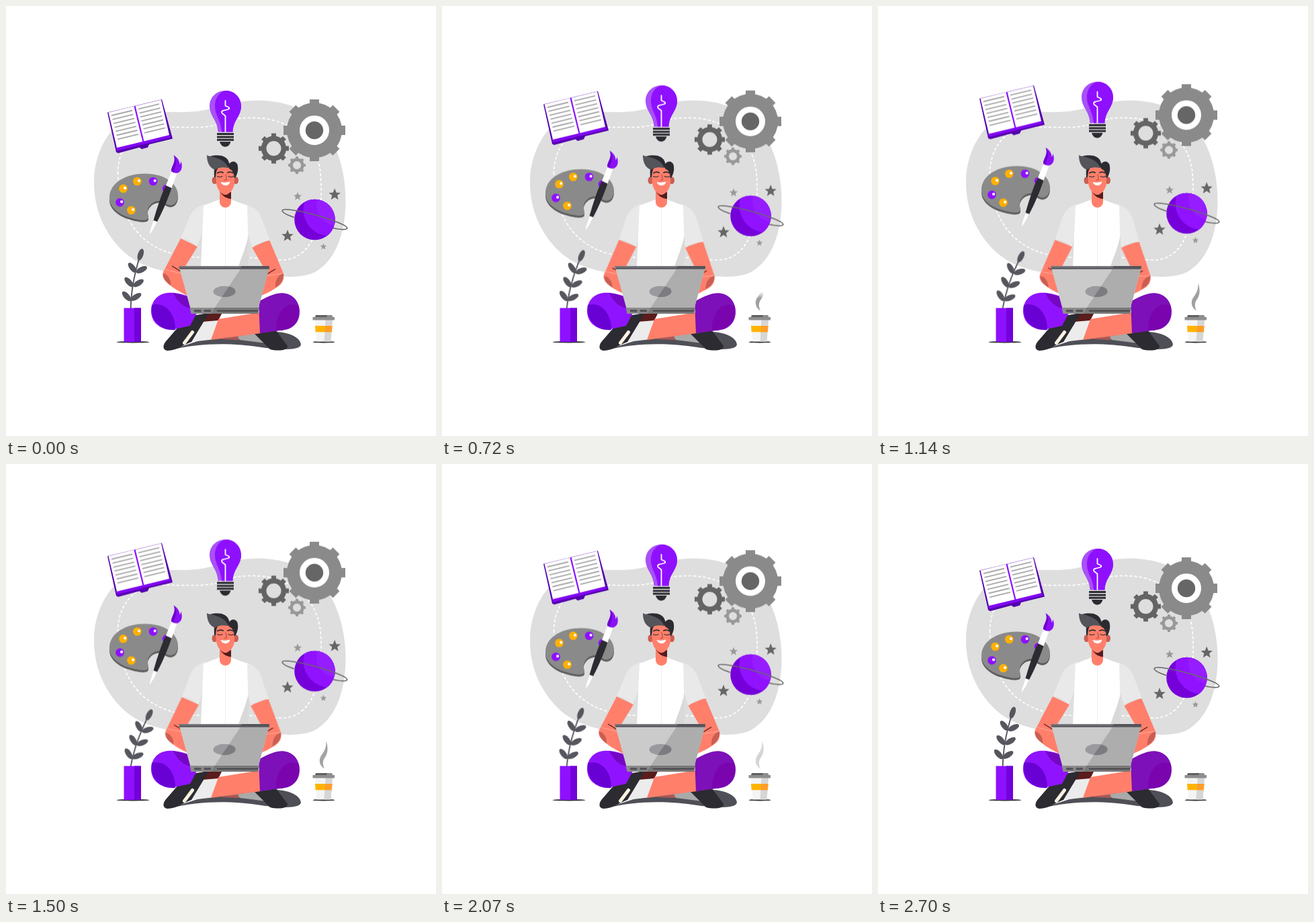
An HTML page that plays this animation: 640x640 px, repeating every 2.76 s.

```html
<!DOCTYPE html>
<html lang="en">
<head>
<meta charset="utf-8">
<title>Creative work</title>
<style>
html, body { margin: 0; width: 100%; height: 100%; overflow: hidden; background: #fff; }
svg { display: block; width: 100%; height: 100%; }

/* 2700 ms of motion followed by a 60 ms rest */
.float, .plant, .arm, .steam, .reveal {
  animation: 2760ms cubic-bezier(.37, 0, .63, 1) infinite;
}
.float { animation-name: float; }
.plant { animation-name: sway; transform-origin: 186px 450px; }
.arm { animation-name: swing; }
.arm.l { --turn: -4.2deg; transform-origin: 290px 300px; }
.arm.r { --turn: 4.2deg; transform-origin: 362px 300px; }
.steam { animation-name: fade; }
.reveal { animation-name: rise; }

@keyframes float {
  0%, 97.83%, 100% { transform: translateY(0); }
  48.91% { transform: translateY(var(--lift)); }
}
@keyframes sway {
  0%, 97.83%, 100% { transform: rotate(0); }
  48.91% { transform: rotate(9.6deg); }
}
@keyframes swing {
  0%, 64.5%, 100% { transform: rotate(0); }
  20.3%, 44.2% { transform: rotate(var(--turn)); }
}
@keyframes rise {
  0% { transform: translateY(48px); }
  48.91%, 100% { transform: translateY(0); }
}
@keyframes fade {
  0%, 48.91% { opacity: 1; }
  97.83%, 100% { opacity: 0; }
}
</style>
</head>
<body>
<svg viewBox="0 0 640 640">
  <defs>
    <path id="teeth" d="M-7-46H7V-36H-7ZM-7 46H7V36H-7ZM-46-7V7H-36V-7ZM46-7V7H36V-7Z"/>
    <g id="cogs"><use href="#teeth"/><use href="#teeth" transform="rotate(45)"/></g>
    <path id="star" d="M0-10L2.7-3.4 9.5-3.1 4.2 1.3 5.9 8.1 0 4.4-5.9 8.1-4.2 1.3-9.5-3.1-2.7-3.4Z"/>
    <g id="dot"><circle r="6.3"/><circle cx="2.6" cy="-1" r="2.1" fill="#fff"/></g>
    <ellipse id="leaf" rx="9" ry="4.1"/>
    <path id="palette" d="M154 284C155 262 180 249.5 207 249.5C238 249.5 257 266 256 283C255 296 245 300 236 293C228 286 214 292 211 303C210 311 214 313 211 317C206 321 190 317 178 313C164 307 153 297 154 284Z"/>
    <path id="lines" d="M157 163l31-7.5m-29.5 13.4l31-7.5m-29.5 13.4l31-7.5m-29.5 13.4l31-7.5m-29.5 13.4l31-7.5m-29.5 13.4l31-7.5m-29.5 13.4l31-7.5"/>
    <clipPath id="globe"><circle cx="459.5" cy="318" r="30.3"/></clipPath>
    <linearGradient id="edge" x2="0" y2="1">
      <stop offset="0" stop-color="#fff" stop-opacity="0"/>
      <stop offset=".16" stop-color="#fff"/>
    </linearGradient>
    <mask id="wisp" maskUnits="userSpaceOnUse" x="440" y="390" width="60" height="80">
      <rect class="reveal" x="450" y="404" width="40" height="60" fill="url(#edge)"/>
    </mask>
  </defs>

  <path fill="#dedede" d="M131 262C131 215 160 158 215 157C245 157 270 160 295 155C325 149 345 140 375 140.500C425 141 455 160 473 182C497 212 505.500 255 505.500 290C505.500 335 492 378 460 396C445 403 430 404 400 402L250 397C215 392 185 380 164 354C144 330 131 300 131 262Z"/>
  <path fill="none" stroke="#fff" stroke-width="1.700" stroke-dasharray="4.200 3" d="M166.500 250C166 215 186 181 230 180C260 180 290 183 314 177C335 168 352 165 380 167C430 172 465 205 468 250C473 310 462 378 410 378C385 378 375 374 350 374H290C235 374 170 350 166.500 250Z"/>

  <!-- book -->
  <g class="float" style="--lift:-22px">
    <path fill="#5400ae" d="M151 158.500L232 139L248 197.500 213 206 211 210.500 202 213 198.500 210.500 167 219 164 217.500Z"/>
    <path fill="#8208f2" d="M163 211L243 191.500 245.500 195.500 166 215.500Z"/>
    <path fill="#fff" d="M152.500 158.500L191 149 204.500 201.500 165 211ZM192 149L231 139.500 243 192 204.500 201.500Z"/>
    <path stroke="#8b11ff" stroke-width="2.200" d="M191.500 149L204.500 202"/>
    <g fill="none" stroke="#a9a9a9" stroke-width="1.900"><use href="#lines"/><use href="#lines" x="40" y="-9.600"/></g>
  </g>

  <!-- bulb -->
  <g class="float" style="--lift:-14px">
    <path fill="#a950f6" d="M326.500 126C340 126 350 136 350 149C350 164 338 170 337.500 187.500H315.500C315 170 303 164 303 149C303 136 313 126 326.500 126Z"/>
    <path fill="#8f10ff" d="M329 126C341 127 350 137 350 149C350 164 338 170 337.500 187.500H321C320 170 311 163 311 149C311 136 319 126 329 126Z"/>
    <path fill="none" stroke="#fff" stroke-width="1.800" stroke-linecap="round" stroke-linejoin="round" d="M326.500 187V163.500L322 160C320 158 321 156 324 155.500L330 154C333 153 333 151.500 331 150.500L326.500 148.500V141"/>
    <path stroke="#2b2b31" stroke-width="3" d="M314 190.500H339M314 195H339M314 199.300H339"/>
    <path fill="#2b2b31" d="M318 202H334.500C333 207 330 209.500 326.300 209.500S319.500 207 318 202Z"/>
  </g>

  <!-- gears -->
  <g class="float" style="--lift:-24px">
    <g transform="translate(459 185)">
      <circle r="31.500" fill="#fff" stroke="#8a8a8a" stroke-width="19"/>
      <use href="#cogs" fill="#8a8a8a"/>
      <circle r="13.200" fill="#666"/>
    </g>
    <g transform="translate(398.500 212)">
      <circle r="14.800" fill="none" stroke="#646464" stroke-width="7.600"/>
      <use href="#cogs" transform="scale(.49)" fill="#646464"/>
    </g>
    <g transform="translate(433 237)">
      <circle r="8.400" fill="none" stroke="#989898" stroke-width="4.600"/>
      <use href="#cogs" transform="scale(.28)" fill="#989898"/>
    </g>
  </g>

  <!-- palette and brush -->
  <g class="float" style="--lift:-12px">
    <use href="#palette" y="3" fill="#5d5d5d"/>
    <use href="#palette" fill="#8a8a8a"/>
    <g fill="#ffb000"><use href="#dot" x="174.500" y="271.800"/><use href="#dot" x="195.300" y="261"/><use href="#dot" x="186.500" y="304"/></g>
    <g fill="#8f10ff"><use href="#dot" x="219" y="261"/><use href="#dot" x="169.500" y="292.300"/><use href="#dot" x="239" y="272"/></g>
    <path fill="#fff" stroke="#d0d0d0" stroke-width=".5" d="M213 341C214 333 217 327 220 317L225.500 320C221 330 218 336 213 341Z"/>
    <path fill="#2b2b31" d="M219.500 319C225 300 231 281 238 267L246.500 270.500C242 285 234 304 225 321Z"/>
    <path fill="#fff" d="M238 267L246.500 246 254.500 249 246.500 271Z"/>
    <path fill="#8a10f5" d="M246 246C246 238 254 232 249.500 222C256 226 258.500 231 258.500 236C260 234 260.500 232 260.500 231C263 239 262 246 255.500 248.500C252 249 249 248 246 246Z"/>
    <path fill="#6d00d0" d="M246 246C246 238 254 232 249.500 222C258 232 250 239 250 248Z"/>
  </g>

  <!-- planet and stars -->
  <g class="float" style="--lift:-10px">
    <g clip-path="url(#globe)">
      <path fill="#7600da" d="M429 287h61v62h-61z"/>
      <circle cx="482" cy="303" r="39.500" fill="#9012ff"/>
      <circle cx="492" cy="297" r="30" fill="#961dff"/>
    </g>
    <path transform="translate(459.500 317.500) rotate(15.300)" fill="none" stroke="#686868" stroke-width="1.700" d="M-30 5.300C-43 4.500-50 2.500-50 0C-50-3.500-28-6.500 0-6.500S50-3.500 50 0C50 2.500 43 4.500 30 5.300"/>
    <g fill="#666"><use href="#star" transform="translate(489.200 280.800) scale(.92)"/><use href="#star" transform="translate(419 342.300) scale(.92)"/></g>
    <g fill="#999"><use href="#star" transform="translate(434 283.500) scale(.65)"/><use href="#star" transform="translate(472.500 358.300) scale(.5)"/></g>
  </g>

  <!-- plant -->
  <ellipse cx="189" cy="500.200" rx="24.500" ry="1.200" fill="#333"/>
  <g class="plant" fill="#56565e">
    <path fill="none" stroke="#56565e" stroke-width="1.900" d="M185.500 455C186 425 190 402 200 370"/>
    <use href="#leaf" transform="translate(200.300 370) rotate(-72)"/>
    <use href="#leaf" transform="translate(179.500 432) rotate(48)"/>
    <use href="#leaf" transform="translate(193.500 433) rotate(-32)"/>
    <use href="#leaf" transform="translate(183 411) rotate(48)"/>
    <use href="#leaf" transform="translate(197 412.500) rotate(-32)"/>
    <use href="#leaf" transform="translate(188 389.500) rotate(52)"/>
    <use href="#leaf" transform="translate(201.800 392.500) rotate(-27)"/>
  </g>
  <path fill="#8f10ff" d="M175.500 449.500H201V500H175.500Z"/>
  <path fill="#7300da" d="M191 449.500H201V500H191Z"/>

  <!-- coffee -->
  <g mask="url(#wisp)">
    <path class="steam" fill="#a0a0a0" d="M476.500 412C480 423 479 431 474.500 437C471 442 471 447 474 453.500C467 449 465 442 468.500 435C473 428 477 424 476.500 412Z"/>
  </g>
  <ellipse cx="473" cy="500.200" rx="16.500" ry="1.200" fill="#333"/>
  <path fill="#f4f4f4" d="M460 467H486L483.500 499.500H462.500Z"/>
  <path fill="#d6d6d6" d="M475.500 467H486L483.500 499.500H473.500Z"/>
  <path fill="#ffb400" d="M460 476H485.500L484.800 485.300H460.700Z"/>
  <path fill="#ff9d2a" d="M475 476H485.500L484.800 485.300H474.300Z"/>
  <path fill="#5f5f64" d="M461 460H485L486 463H460Z"/>
  <path fill="#8e8e8e" d="M478 460H485L486 463H477ZM456.500 463H489V467.500H456.500Z"/>

  <!-- legs -->
  <path fill="#4f4f57" d="M242 513C290 500 340 502 380 508C410 512 437 513 439 504C438 492 418 485 400 485L300 494Z"/>
  <path fill="#a9a9a9" d="M344 492L372 486 388 502 348 497Z"/>
  <path fill="#a85a55" d="M318 496L344 491 348 497Z"/>
  <path fill="#2b2b31" d="M370 488L402 483 419 506C420 513 404 514 393 511Z"/>
  <path fill="#ececec" d="M296 464L314 468 306 496.500 276 500Z"/>
  <path fill="#5a1c1c" d="M294 456H322L316 468 292 470Z"/>
  <path fill="#ff7f6b" d="M316 466L378 456 379 487 305 497Z"/>
  <path fill="#2b2b31" d="M270 462L302 457 276 500C264 504 254 513 240 513C233 512 233 505 238 499Z"/>
  <path stroke="#fff3e2" stroke-width="5" stroke-linecap="round" d="M265.500 501.500L277.500 485.500"/>
  <path fill="#9013ff" d="M276 434C262 428 250 426 240 427C224 429 216 441 216 454C216 470 228 481 246 482L274 476 285 455Z"/>
  <path fill="#6900d4" d="M217 445C236 440 252 456 252 482C231 484 214 468 217 445Z"/>
  <path fill="#7508c2" d="M249 427C256 442 265 448 275 450L280 440 273 433Z"/>
  <path fill="#7d10b8" d="M376 440C392 430 406 426 414 427.500C428 429 437 441 437 455C437 470 428 481 412 482.500L378 487Z"/>
  <path fill="#7a04ae" d="M436 447C418 437 401 456 402 483C425 484 439 470 436 447Z"/>

  <!-- arms -->
  <g class="arm l">
    <path fill="#ff7f6b" d="M260 346L285 358 264 392 285 400 280 436C262 428 245 418 238 410C232 404 232 398 236 392Z"/>
    <path fill="#c95f52" d="M234 398C240 399 246 406 245 416C238 411 233 405 234 398Z"/>
    <path stroke="#ffab9c" d="M237 392L262 398.500"/>
    <path stroke="#5a1f1f" stroke-width="1.400" d="M247 387L261 395.500"/>
    <path fill="#e9e9e9" d="M296 295C283 299 276 306 272 317L260 345.500Q275 348 284 358L293 336 300 300Z"/>
  </g>
  <g class="arm r">
    <path fill="#ff7f6b" d="M366 359L392 348 412 396C415 403 413 410 408 415C398 423 385 430 368 435L362 404 388 397Z"/>
    <path fill="#c95f52" d="M413 398C406 400 400 407 401 419C408 415 414 407 413 398Z"/>
    <path stroke="#ffab9c" d="M388 401.500L412 398"/>
    <path stroke="#5a1f1f" stroke-width="1.400" d="M401 391.500L387 400"/>
    <path fill="#e9e9e9" d="M356 295C369 299 376 305 380 315L393 349Q376 350 367 360L359 336 354 300Z"/>
  </g>

  <!-- shirt and head -->
  <path fill="#fff" d="M318 288L294 297 290 388H361.500L359 297 335 288Z"/>
  <path fill="#d9d9d9" d="M361 341C357 360 351 372 346 388H361.500Z"/>
  <path stroke="#eee" d="M326.500 299V388"/>
  <path fill="#ff7f6b" d="M318 270H335V291C335 303 318 303 318 291Z"/>
  <path fill="#561b1d" d="M318 275L335 277V287C328 287 321 282 318 275Z"/>
  <g fill="#c95f52"><ellipse cx="310.500" cy="259.500" rx="4" ry="5.500"/><ellipse cx="342" cy="259.500" rx="4" ry="5.500"/></g>
  <path fill="#ff7f6b" d="M311.500 240C318 233 336 233 341 241L340 264C339 273 332 281 326.500 281S314 273 313 264Z"/>
  <path fill="#2b2b31" d="M331.500 236C335 230 342 230 344.500 236C346.500 244 344 251 341 256H339.500C340 249 337 244 332 242ZM311 239L317 240C312 244 313 250 312 255H310C310 250 309 245 311 239Z"/>
  <path fill="#54545b" d="M299 222C306 226 318 222 326 228C332 232 333 238 331 241C322 239 314 241 311 244C302 240 299 232 299 222Z"/>
  <path fill="#2b2b31" d="M304 223.500C315 221 330 221 332.500 235C332.500 238 332 240 331 241C327 230 315 226 304 223.500Z"/>
  <g fill="none" stroke="#2b2b31" stroke-linecap="round">
    <path stroke-width="1.900" d="M315 248.500Q319 246 323 248M330 248Q334 246 338 248.500"/>
    <path stroke-width="1.100" d="M314.500 253.500Q318 255.500 322 253.500M331 253.500Q335 255.500 338.500 253.500"/>
    <path stroke="#b44f45" stroke-width="1.200" d="M327 251L328.500 258.500 325 259.500"/>
  </g>
  <path fill="#fff" d="M319.500 262Q326.500 263.500 333.500 261.500C332 269 322 269 319.500 262Z"/>

  <!-- laptop -->
  <path fill="#cbcbcb" d="M258 390H391.500L375.500 450H274.500Z"/>
  <path fill="#adadad" d="M350 390H391.500L375.500 450H310Z"/>
  <path fill="#76767c" d="M257 387H392V391.500H258.500Z"/>
  <path fill="#55555c" d="M351 387H392L391 391.500H348ZM258 389.500H391.500V391.500H258.500Z"/>
  <ellipse cx="325" cy="425" rx="16.500" ry="8.300" fill="#9a9a9e"/>
  <path fill="#7c7c80" d="M332 417.500C338 418.500 341.500 421.500 341.500 425C341.500 429.500 334 433.300 325 433.300L321 433Z"/>
  <path fill="#8c8c8c" d="M273.500 449H377L375 458H275.500Z"/>
  <path fill="#777" d="M311 449H377L375 458H305Z"/>
  <path fill="#54545a" d="M280 452H290.500V455.500H280ZM294.500 452H305V455.500H294.500Z"/>
  <path stroke="#3c3c42" stroke-width="1.500" d="M314 453.800H375"/>
</svg>
</body>
</html>
```
